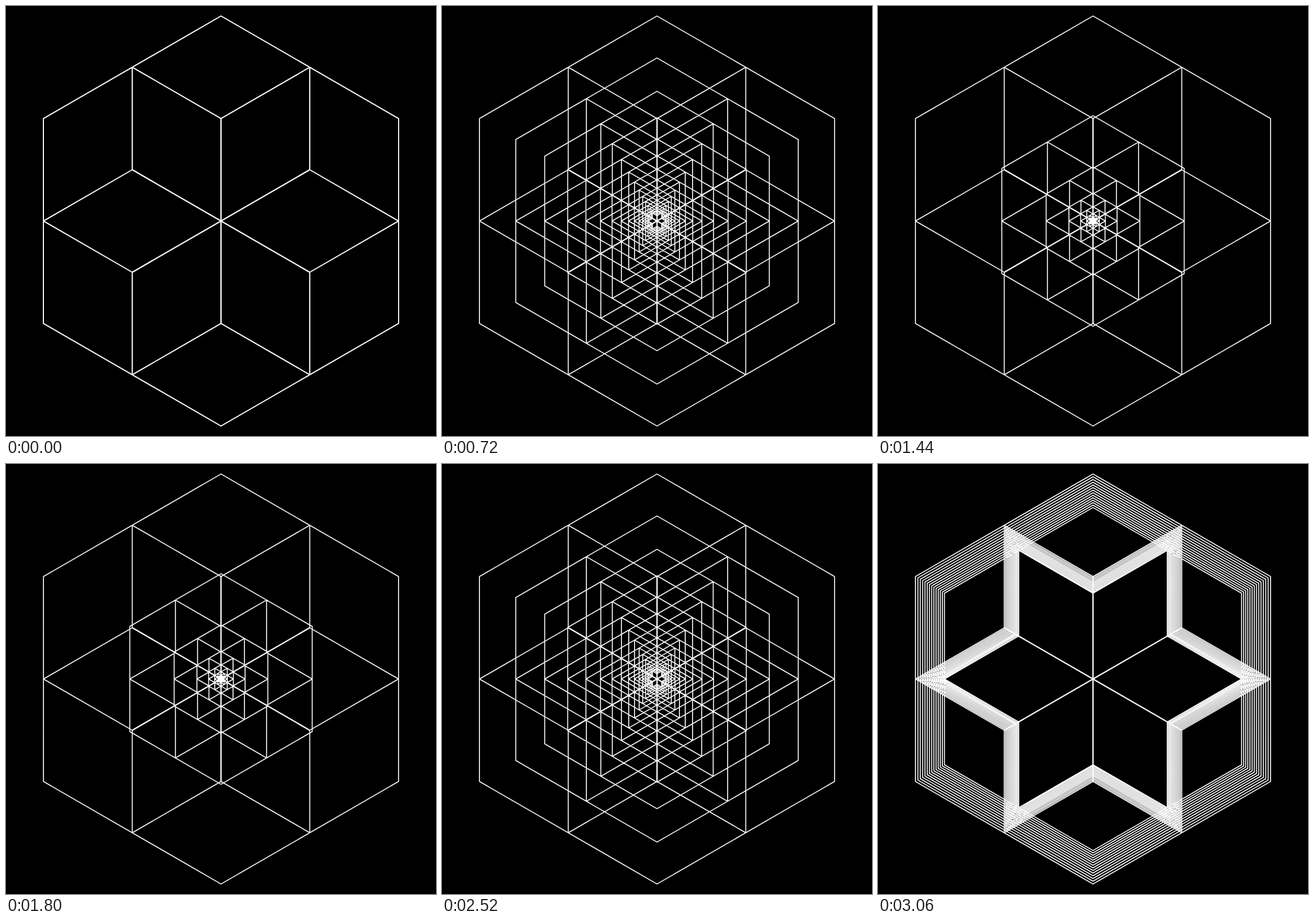
An HTML page for the animation above (3.24 s loop, 748 by 748 pixels).

```html
<!DOCTYPE html>
<html lang="en">
<head>
<meta charset="utf-8">
<title>Nested hexagons</title>
<style>
  html, body { margin: 0; width: 100%; height: 100%; overflow: hidden; background: #000; }
  svg { display: block; width: 100%; height: 100%; }
  path { fill: none; stroke: #fff; stroke-width: 1.65; stroke-linejoin: round; }
  #spokes { stroke-width: 2.3; }
</style>
</head>
<body>
<svg viewBox="0 0 748 748">
  <path id="nested"/>
  <path id="outer"/>
  <path id="spokes"/>
</svg>
<script>
const CENTER = 374;
const RADIUS = 356.6;
const COPIES = 13;
const STEP = 180;
const HALF = 9;
const HANDLE = 0.392;
const sixths = [0, 1, 2, 3, 4, 5];
const nested = document.getElementById('nested');

function point(radius, degrees) {
  const a = degrees * Math.PI / 180;
  const x = CENTER + radius * Math.cos(a);
  const y = CENTER + radius * Math.sin(a);
  return x.toFixed(2) + ' ' + y.toFixed(2);
}

const polygon = points => 'M' + points.join('L') + 'Z';

// A hexagon with a six-pointed star touching the middle of its sides.
function figure(scale) {
  const r = RADIUS * scale;
  const hexagon = sixths.map(i => point(r, 30 + 60 * i));
  const star = sixths.flatMap(i => [
    point(r * Math.sqrt(3) / 2, 60 * i),
    point(r / 2, 60 * i + 30)
  ]);
  return polygon(hexagon) + polygon(star);
}

// cubic-bezier(HANDLE, 0, 1 - HANDLE, 1), solved by bisection.
function ease(s) {
  let low = 0, high = 1, u = 0.5;
  for (let i = 0; i < 30; i++) {
    u = (low + high) / 2;
    const v = 1 - u;
    const x = 3 * HANDLE * u * v * v + 3 * (1 - HANDLE) * u * u * v + u ** 3;
    if (x < s) low = u; else high = u;
  }
  return u * u * (3 - 2 * u);
}

let shown = -1;

function render(time) {
  const step = Math.floor(time / STEP) % (2 * HALF);
  if (step === shown) return;
  shown = step;
  const ratio = 1 - 0.5 * ease(1 - Math.abs(step - HALF) / HALF);
  let d = '';
  for (let n = 1; n <= COPIES; n++) d += figure(ratio ** n);
  nested.setAttribute('d', d);
}

document.getElementById('outer').setAttribute('d', figure(1));
document.getElementById('spokes').setAttribute('d', sixths.map(i =>
  'M' + point(0, 0) + 'L' + point(RADIUS / 2, 30 + 60 * i)).join(''));

const start = performance.now();
function tick() {
  render(performance.now() - start);
  requestAnimationFrame(tick);
}
tick();
</script>
</body>
</html>
```
